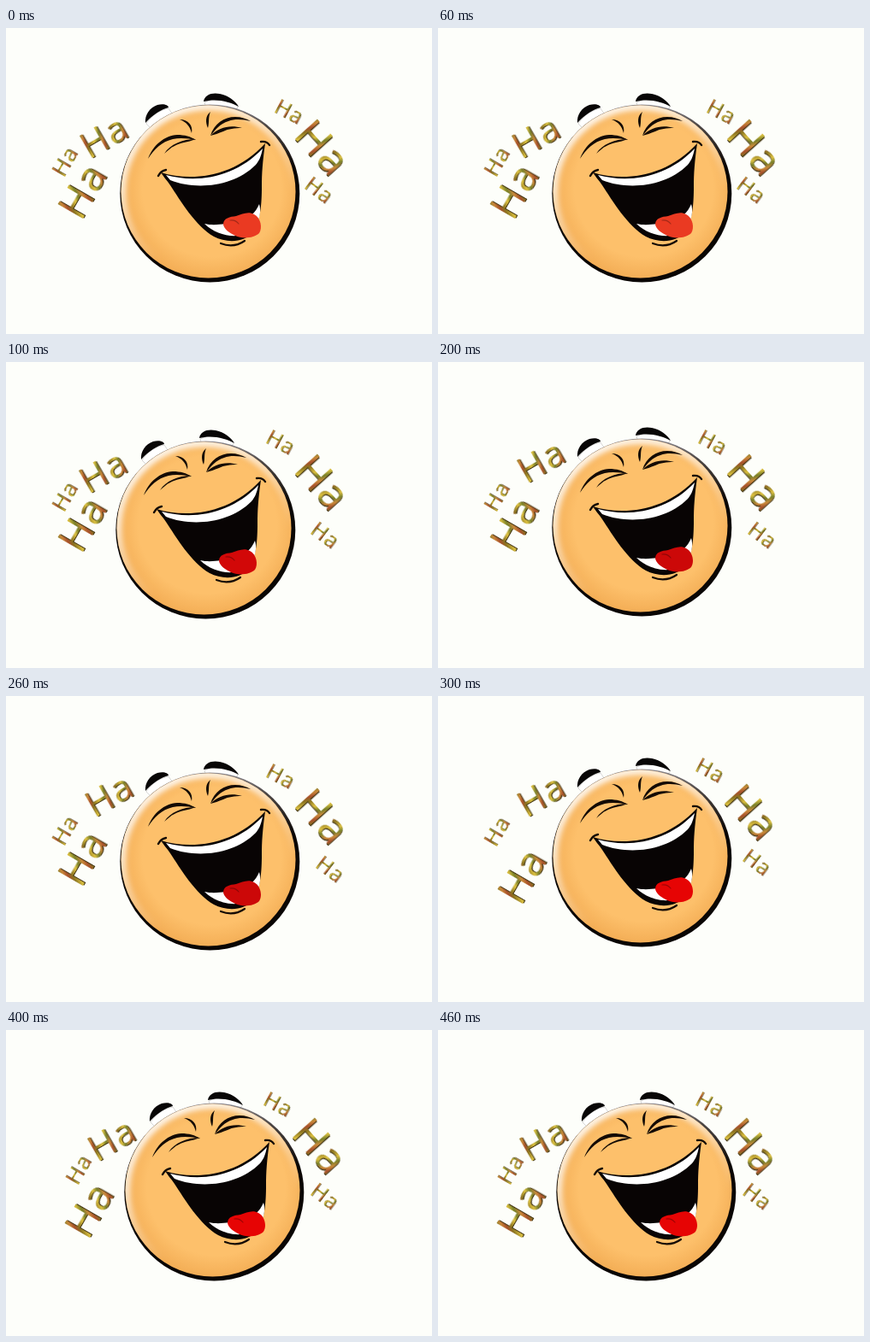
Animation, 498 px wide and 358 px high, one loop 500 ms. Source, as an HTML page:

```html
<!DOCTYPE html>
<html lang="en">
<head>
<meta charset="utf-8">
<title>Laughing face</title>
<style>
  html, body { margin: 0; width: 100%; height: 100%; overflow: hidden; background: #fdfefa; }
  svg { display: block; width: 498px; height: 358px; }
  text { font-family: "Open Sans", "Noto Sans", sans-serif; letter-spacing: .04em; }
</style>
</head>
<body>
<svg id="stage" viewBox="0 0 498 358">
  <defs>
    <linearGradient id="rim" x1="0" y1="0" x2="0" y2="1">
      <stop offset="0" stop-color="#8d8a90"/>
      <stop offset=".12" stop-color="#4c4644"/>
      <stop offset=".35" stop-color="#0a0604"/>
    </linearGradient>
    <radialGradient id="skin" cx=".52" cy=".48" r=".53">
      <stop offset=".75" stop-color="#fdc06b"/>
      <stop offset="1" stop-color="#f3ad55"/>
    </radialGradient>
    <linearGradient id="shine" x1=".1" y1="0" x2=".5" y2=".75">
      <stop offset="0" stop-color="#fff"/>
      <stop offset=".45" stop-color="#fff" stop-opacity=".75"/>
      <stop offset="1" stop-color="#fff" stop-opacity="0"/>
    </linearGradient>
    <linearGradient id="gold" x1="0" y1="0" x2=".34" y2=".22" spreadMethod="repeat">
      <stop offset="0" stop-color="#8a7420"/>
      <stop offset=".25" stop-color="#dcc040"/>
      <stop offset=".45" stop-color="#77802a"/>
      <stop offset=".65" stop-color="#c9893a"/>
      <stop offset=".82" stop-color="#a8502c"/>
      <stop offset="1" stop-color="#8a7420"/>
    </linearGradient>
    <filter id="soft" x="-10%" y="-10%" width="120%" height="120%"><feGaussianBlur stdDeviation="3"/></filter>
    <clipPath id="disc"><ellipse cx="236.5" cy="191.5" rx="102" ry="101"/></clipPath>
  </defs>

  <g id="words"></g>

  <g id="face">
    <!-- eyebrows -->
    <path fill="#fff" stroke="#bbb" stroke-width=".6" d="M164 112C170 102 180 96 190 94L194 100L170 118Z"/>
    <path fill="#fff" stroke="#bbb" stroke-width=".6" d="M232 87C243 81 262 84 271 92L268 98L234 94Z"/>
    <path fill="#080606" d="M163 111C162 102 168 93 177 90C184 88 190 90 190 93C182 95 172 101 163 111Z"/>
    <path fill="#080606" d="M231 86C232 78 241 75 250 77C260 79 269 86 272 92C262 86 245 82 231 86Z"/>

    <ellipse cx="238.3" cy="193.5" rx="105" ry="104" fill="url(#rim)"/>
    <ellipse cx="236.5" cy="191.5" rx="102" ry="101" fill="url(#skin)"/>
    <g clip-path="url(#disc)">
      <ellipse cx="236.5" cy="191.5" rx="101" ry="100" fill="none" stroke="url(#shine)" stroke-width="9" filter="url(#soft)"/>
    </g>

    <!-- eyes and frown -->
    <g fill="#140b05">
      <path d="M166 153C172 137 185 126 200 125C209 125 216 127 222 131C213 129 203 128 195 130C182 133 173 142 166 153Z"/>
      <path d="M185 147C192 136 206 130 222 130C212 134 203 134 197 138C192 140 189 144 185 147Z"/>
      <path d="M239 126C243 112 255 104 268 104C275 104 281 106 286 109C277 107 268 106 260 109C250 112 245 119 239 126Z"/>
      <path d="M239 126C249 116 262 113 276 117C267 117 260 118 254 121C248 123 244 125 239 126Z"/>
      <path d="M203 107C213 107 219 114 217 123C215 115 211 110 203 107Z"/>
      <path d="M239 98C233 103 233 110 236 117C238 110 236 105 239 98Z"/>
    </g>

    <!-- mouth -->
    <path fill="#080404" d="M181 169C216 180 267 175 303 135C300 156 299 170 299 186C299 204 298 226 288 239C279 251 258 252 243 244C221 231 204 202 192 184C188 178 184 174 181 169Z"/>
    <path fill="#fff" d="M187 172C224 182 268 175 300 141C298 151 296 155 292 160C266 186 222 190 192 178Z"/>
    <path fill="#fff" d="M232 229C241 231 249 230 256 229L270 243C257 244 242 239 232 229Z"/>
    <path fill="#fff" d="M287 219C291 215 294 211 296 206C298 213 297 219 295 225Z"/>
    <path id="tongue" fill="#e00505" d="M254 230C254 222 262 221 269 220C276 218 283 214 290 218C298 222 300 234 296 240C290 246 276 247 268 243C260 239 255 235 254 230Z"/>
    <path fill="none" stroke="#000" stroke-opacity=".3" stroke-width="1.2" stroke-linecap="round" d="M262 225Q268 224 272 229"/>
    <g fill="none" stroke="#140b05" stroke-linecap="round">
      <path stroke-width="2.4" d="M178 173Q181 167 187 166"/>
      <path stroke-width="2.4" d="M298 133Q305 132 308 137"/>
      <path stroke-width="2.2" d="M251 252Q266 258 279 249"/>
    </g>
  </g>
</svg>

<script>
const $ = id => document.getElementById(id);
const NS = "http://www.w3.org/2000/svg";
const LOOP = 500;

// Holds each value for an equal share of the loop.
function hold(el, prop, values) {
  const frames = values.map((v, i) => ({ [prop]: v, offset: i / values.length, easing: "step-end" }));
  frames.push({ [prop]: values[values.length - 1], offset: 1 });
  el.animate(frames, { duration: LOOP, iterations: Infinity });
}

const shift = ([x, y]) => `translate(${x}px, ${y}px)`;

function add(parent, tag, attrs) {
  const el = document.createElementNS(NS, tag);
  for (const k in attrs) el.setAttribute(k, attrs[k]);
  return parent.appendChild(el);
}

// size, angle, then the baseline start at each step
const laughs = [
  [26, -60, [[69, 174], [69, 175], [69, 175], [69, 176], [85, 181]]],
  [42, -30, [[101, 152], [100, 153], [107, 141], [107, 141], [110, 153]]],
  [48, -60, [[90, 223], [90, 222], [90, 222], [99, 243], [98, 243]]],
  [25, 28, [[314, 99], [304, 95], [304, 95], [301, 88], [301, 88]]],
  [50, 48, [[338, 130], [338, 131], [338, 131], [335, 126], [335, 126]]],
  [25, 37, [[349, 188], [356, 201], [362, 201], [356, 193], [356, 193]]]
];

for (const [size, angle, spots] of laughs) {
  const mover = add($("words"), "g", {});
  const turn = add(mover, "g", { transform: `rotate(${angle})`, "font-size": size });
  const x = -size * 0.1;
  const edge = size / 45;
  add(turn, "text", { x: x + edge, y: edge * 0.6, fill: "#40320f" }).textContent = "Ha";
  add(turn, "text", { x, y: 0, fill: "url(#gold)" }).textContent = "Ha";
  hold(mover, "transform", spots.map(shift));
}

hold($("face"), "transform", [[0, 0], [-5, 3], [0, 0], [0, -4], [5, -4]].map(shift));
hold($("tongue"), "fill", ["#ea3a22", "#d20808", "#cc0808", "#e60404", "#e60404"]);
</script>
</body>
</html>
```
